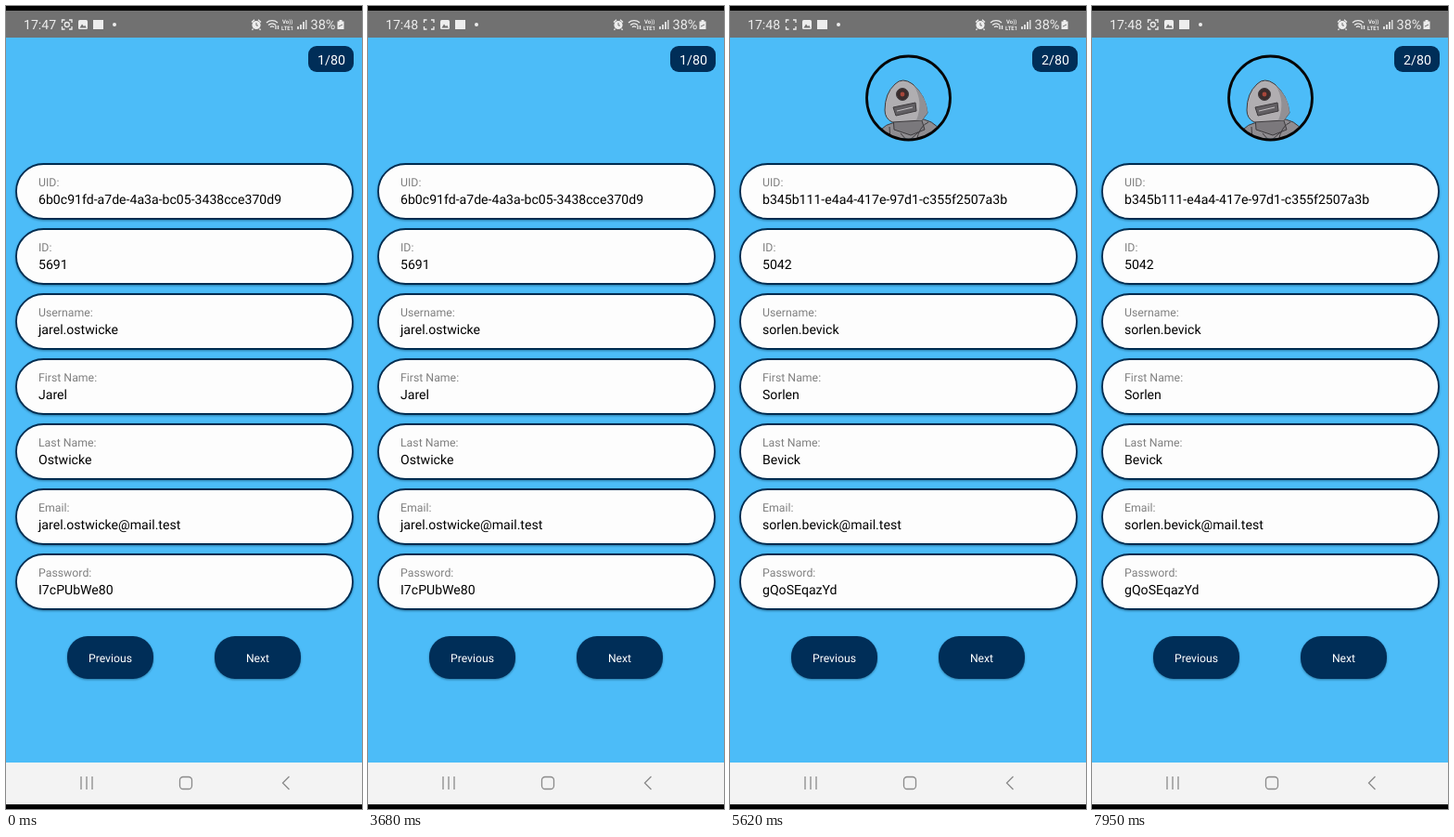
An HTML page for the animation above (8 s loop, 384 by 864 pixels).

```html
<!DOCTYPE html>
<html lang="en">
<head>
<meta charset="utf-8">
<title>User browser</title>
<style>
  html, body { margin: 0; width: 100%; height: 100%; overflow: hidden; background: #000; }
  svg { display: block; width: 384px; height: 864px; font-family: Roboto, sans-serif; text-rendering: geometricPrecision; }
  .line { fill: none; stroke: #ededed; stroke-width: 1.3; }
  .pale { fill: #ededed; }
  .nav { fill: none; stroke: #8a8a8a; stroke-width: 1.3; }
  .pill { fill: #fdfdfd; stroke: #002c50; stroke-width: 1.8; }
  .raised { filter: drop-shadow(0 1.5px 1.3px rgba(0, 40, 60, .45)); }
  .navy { fill: #002e58; }
  .label { font-size: 12.3px; fill: #808080; }
  .value { font-size: 14.1px; fill: #000; }
  .button { font-size: 12.2px; fill: #fff; text-anchor: middle; }
</style>
</head>
<body>
<svg viewBox="0 0 384 864">
  <defs>
    <clipPath id="disc"><circle cx="192.5" cy="99" r="44"/></clipPath>
    <radialGradient id="glow">
      <stop offset="0" stop-color="#fff" stop-opacity=".6"/>
      <stop offset=".65" stop-color="#fff" stop-opacity=".45"/>
      <stop offset="1" stop-color="#fff" stop-opacity="0"/>
    </radialGradient>
  </defs>
  <rect width="384" height="864"/>
  <rect y="5" width="384" height="29" fill="#717171"/>
  <rect y="34" width="384" height="780" fill="#4cbcf8"/>
  <rect y="814" width="384" height="45" fill="#f3f3f3"/>

  <!-- Status bar -->
  <g class="pale">
    <text id="clock" x="19" y="25" font-size="14.1"></text>
    <rect x="78" y="15" width="10" height="10" rx="1.5"/>
    <path d="M79.5 23.5l2.5-4 2 2.5 1.2-1.3 1.6 2.8z" fill="#717171"/>
    <rect x="94" y="15" width="11" height="10"/>
    <circle cx="117" cy="20" r="2"/>
    <circle cx="270" cy="20.5" r="4.6"/>
    <path d="M265 17.5l3-2.7M275 17.5l-3-2.7M266.5 24.5l-1 1.3M273.5 24.5l1 1.3" class="line"/>
    <path d="M270 18v3h2" fill="none" stroke="#717171"/>
    <text x="298" y="19" font-size="6" font-weight="700">Vo))</text>
    <text x="297" y="25.5" font-size="6" font-weight="700">LTE1</text>
    <path d="M314 22h2v3h-2zM317 20h2v5h-2zM320 17h2v8h-2zM323 15h1.5v10h-1.5z" opacity=".85"/>
    <text x="328.5" y="25" font-size="14.5">38%</text>
    <path d="M359.5 15h3v1.5h2v8.5h-7v-8.5h2z"/>
    <path d="M359 22l4-2" stroke="#717171"/>
  </g>
  <path class="line" d="M60.5 18v-3h3M68 15h3v3M71 22v3h-3M63.5 25h-3v-3"/>
  <circle id="record" class="line" cx="65.8" cy="20" r="2.5"/>
  <path class="line" d="M281 18a9 9 0 0 1 12 0M283 20.5a6 6 0 0 1 8 0M285 22.8a3 3 0 0 1 4 0M291 25v-4M293.5 21v4"/>

  <!-- Navigation bar -->
  <path class="nav" d="M81 829v14M87 829v14M93 829v14M305.5 829l-7 7 7 7"/>
  <rect class="nav" x="187.5" y="829.5" width="13" height="13" rx="3.5"/>

  <rect class="navy" x="326" y="43" width="49" height="28" rx="9"/>
  <text id="count" x="351" y="62.5" font-size="14.2" fill="#fff" text-anchor="middle"></text>

  <g id="avatar">
    <g clip-path="url(#disc)">
      <g id="antenna" fill="#79766a" stroke="#33322d">
        <path d="M164 146q2-15 17-18l22-3q22 4 27 21z" fill="#716e66"/>
        <path d="M198 146q3-17 16-20 13 3 18 20z" fill="#625a57"/>
        <path d="M178 117l24-3 6 17-26 7z" fill="#5f5c52"/>
        <path d="M185 82l.5-22h3.500l2 22z" fill="#d8cfcd"/>
        <path d="M185.500 68h4.500v4h-4.500z" fill="#c0604f" stroke="none"/>
        <path d="M172 101q-1-20 17-21 20-1 22 19l-3 17-10 6-18-2q-7-6-8-19z"/>
        <path d="M204 85q6 14 1 32" fill="none"/>
        <path d="M173 93l27-4 2 10-27 5z" fill="#2b2927"/>
        <path d="M178 96h4v4h-4zM191 94h4v4h-4z" fill="#b8513e" stroke="none"/>
        <path d="M178 108l22-5 2 10-21 5z" fill="#d0b64f"/>
        <path d="M179.500 113l21-5M184 107l2 10M189 106l2 10M195 105l1 9" fill="none"/>
      </g>
      <g id="hood" fill="#b1aeb1" stroke="#3d3a3d">
        <path d="M157 146q4-17 18-20l34-4q18 4 23 24z" fill="#8f8c90"/>
        <path d="M176 119l29-2 5 16-15 6-18-6z" fill="#7b787c"/>
        <path d="M201 146q3-17 13-21M170 146q4-7 2-16M184 137l8 9 11-10" fill="none"/>
        <path d="M167 112q0-18 11-28 8-8 19 0 14 12 16 31l-6 8-32 2q-8-4-8-13z"/>
        <path d="M198 85q15 14 15 30l-6 8-6 0q8-20-3-38z" fill="#929094" stroke="none"/>
        <circle cx="186" cy="95" r="6.500" fill="#3a2c2c"/>
        <circle cx="186" cy="95" r="2.400" fill="#a8463a" stroke="none"/>
        <path d="M176 109l24-5 1 9-22 5z" fill="#625f63"/>
        <path d="M180 113l17-4" stroke="#c4c1c4"/>
      </g>
    </g>
    <circle cx="192.5" cy="99" r="45" fill="none" stroke="#060606" stroke-width="2.800"/>
  </g>

  <g id="fields"></g>

  <g class="raised navy">
    <rect x="66" y="678" width="93" height="46" rx="22"/>
    <rect x="225" y="678" width="93" height="46" rx="22"/>
  </g>
  <text class="button" x="112.5" y="706">Previous</text>
  <text class="button" x="271.5" y="706">Next</text>
  <circle id="touch" cy="702" r="11.5" fill="url(#glow)"/>
</svg>
<script>
const LOOP = 8000, BLINK = 993, FADE = 400;
const $ = id => document.getElementById(id);
const clamp = x => Math.max(0, Math.min(1, x));
const labels = ['UID', 'ID', 'Username', 'First Name', 'Last Name', 'Email', 'Password'];

const user = (uid, id, first, last, password) => {
  const login = `${first}.${last}`.toLowerCase();
  return [uid, id, login, first, last, login + '@mail.test', password];
};
const users = [
  user('6b0c91fd-a7de-4a3a-bc05-3438cce370d9', '5691', 'Jarel', 'Ostwicke', 'I7cPUbWe80'),
  user('b345b111-e4a4-417e-97d1-c355f2507a3b', '5042', 'Sorlen', 'Bevick', 'gQoSEqazYd'),
  user('5bc261ae-ba66-4556-8da2-86ed7c12ddb3', '7014', 'Milona', 'Tesward', 'exmwCILcg1')
];

// Each tap shows a page on release; its avatar starts to fade in at "loaded".
const HOLD = 230, RELEASE = 250;
const taps = [
  { at: 3990, x: 275, page: 1, loaded: 5222 },
  { at: 6130, x: 275, page: 2, loaded: 6840 },
  { at: 7425, x: 113, page: 1, loaded: 0 }
];

$('fields').innerHTML = labels.map((label, i) => {
  const y = 170 + i * 70;
  return `<rect class="pill raised" x="11" y="${y}" width="363" height="59" rx="29.5"/>
    <text class="label" x="35" y="${y + 24}">${label}:</text>
    <text class="value" x="35" y="${y + 42.5}"></text>`;
}).join('');
const values = document.querySelectorAll('.value');

let shown = -1;
function showPage(page) {
  if (page === shown) return;
  shown = page;
  values.forEach((node, i) => node.textContent = users[page][i]);
  $('count').textContent = `${page + 1}/80`;
  $('hood').style.display = page === 1 ? '' : 'none';
  $('antenna').style.display = page === 2 ? '' : 'none';
}

function draw(t) {
  const current = taps.filter(tap => t >= tap.at + HOLD).pop();
  showPage(current ? current.page : 0);
  $('avatar').style.opacity = current ? clamp((t - current.loaded) / FADE) : 0;

  const tap = taps.filter(tap => t >= tap.at).pop();
  if (tap) $('touch').setAttribute('cx', tap.x);
  $('touch').style.opacity = tap ? clamp(1 - (t - tap.at - HOLD) / RELEASE) : 0;

  $('record').style.opacity = clamp(1 - (t % BLINK - 420) / 140);
  $('clock').textContent = t < 1490 ? '17:47' : '17:48';
}

function tick() {
  draw(performance.now() % LOOP);
  requestAnimationFrame(tick);
}
tick();
</script>
</body>
</html>
```
